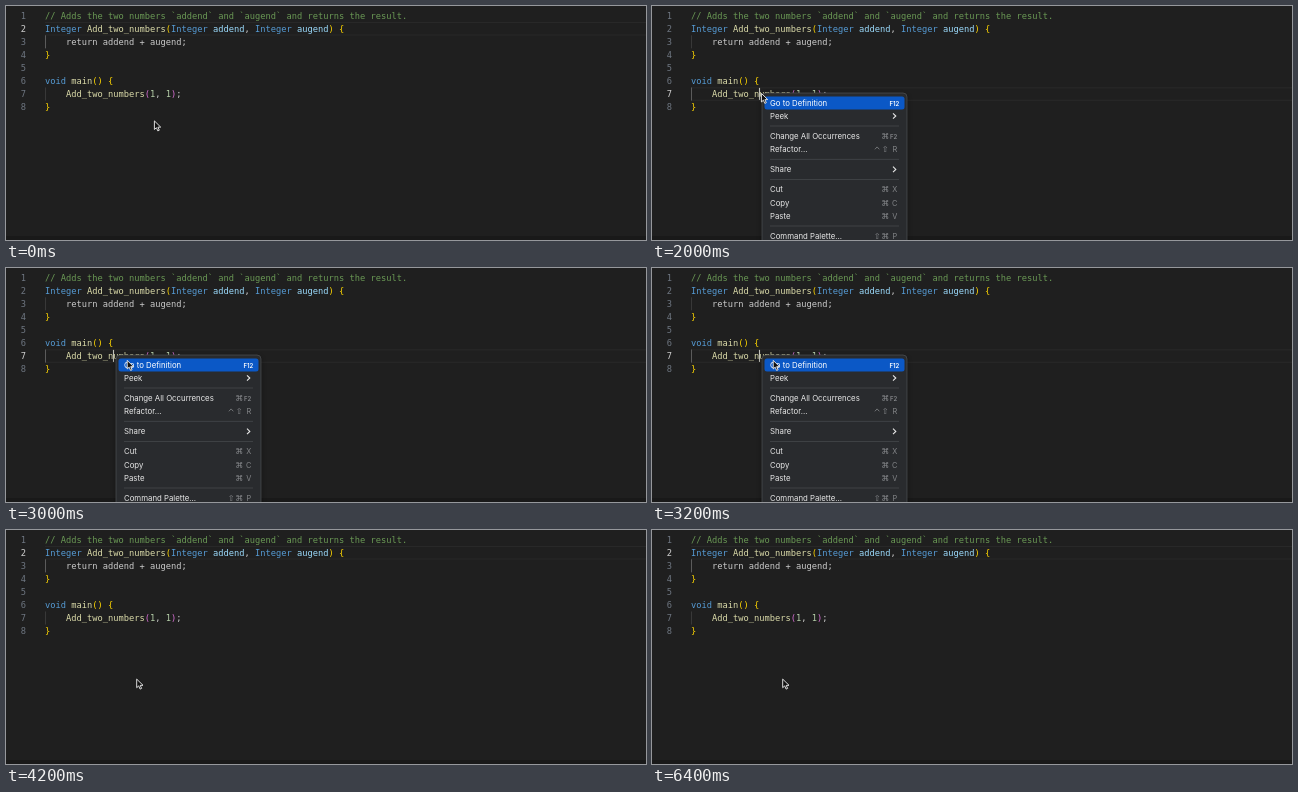
Write an HTML page with a canvas that moves like this. It is 640 px wide and 234 px high and loops after 6500 ms.

```html
<!DOCTYPE html>
<html lang="en">
<head>
<meta charset="utf-8">
<title>Go to Definition</title>
<style>
  html, body { margin: 0; width: 100%; height: 100%; overflow: hidden; background: #1f1f1f; }
  canvas { display: block; width: 640px; height: 234px; }
</style>
</head>
<body>
<canvas id="stage" width="640" height="234"></canvas>
<script>
const ctx = document.getElementById('stage').getContext('2d');
const LOOP = 6500, STEP = 100;
const MENU_OPEN = 2000, MENU_CLOSE = 3500;
const LEFT = 39, CHAR = 5.25, LINE = 13.05;
const CODE_FONT = '8.72px "DejaVu Sans Mono", monospace';
const MENU_FONT = '7.8px Inter, sans-serif';
const KEY_FONT = '7.4px Inter, "DejaVu Sans", sans-serif';

const C = {
  comment: '#6a9955', type: '#569cd6', func: '#dcdcaa', param: '#9cdcfe',
  plain: '#cccccc', gold: '#ffd700', pink: '#da70d6', num: '#b5cea8'
};

// Each line is a list of [text, colour] runs.
const code = [
  [['// Adds the two numbers `addend` and `augend` and returns the result.', C.comment]],
  [['Integer ', C.type], ['Add_two_numbers', C.func], ['(', C.gold], ['Integer ', C.type],
   ['addend', C.param], [', ', C.plain], ['Integer ', C.type], ['augend', C.param], [') {', C.gold]],
  [['    return addend + augend;', C.plain]],
  [['}', C.gold]],
  [],
  [['void ', C.type], ['main', C.func], ['() {', C.gold]],
  [['    ', C.plain], ['Add_two_numbers', C.func], ['(', C.pink], ['1', C.num], [', ', C.plain],
   ['1', C.num], [')', C.pink], [';', C.plain]],
  [['}', C.gold]]
];

const menu = [
  { y: 97, label: 'Go to Definition', key: 'F12' },
  { y: 110, label: 'Peek', sub: true },
  { y: 130, label: 'Change All Occurrences', key: 'F2', mods: '⌘' },
  { y: 143.3, label: 'Refactor…', key: 'R', mods: '^⇧' },
  { y: 163.4, label: 'Share', sub: true },
  { y: 183.5, label: 'Cut', key: 'X', mods: '⌘' },
  { y: 196.8, label: 'Copy', key: 'C', mods: '⌘' },
  { y: 210, label: 'Paste', key: 'V', mods: '⌘' },
  { y: 230.2, label: 'Command Palette…', key: 'P', mods: '⇧⌘' }
];
const rules = [120, 153.3, 173.4, 220];

// Pointer path: time, x, y
const path = [
  [0, 148, 114.5], [600, 148, 114.5], [1100, 110.8, 98], [1200, 109, 92], [1400, 109, 87],
  [2100, 109, 87], [2500, 116.8, 91.5], [2900, 120.8, 92], [3400, 120.8, 92],
  [3700, 130.3, 148.7], [LOOP, 130.3, 148.7]
];

function rect(x, y, w, h, fill) {
  ctx.fillStyle = fill;
  ctx.fillRect(x, y, w, h);
}

function text(str, x, y, fill, align = 'left') {
  ctx.fillStyle = fill;
  ctx.textAlign = align;
  ctx.fillText(str, x, y);
}

function poly(points, stroke, width) {
  ctx.beginPath();
  points.forEach(([x, y]) => ctx.lineTo(x, y));
  ctx.strokeStyle = stroke;
  ctx.lineWidth = width;
  ctx.stroke();
}

function pointerAt(t) {
  const i = path.findIndex(p => p[0] > t);
  const [t0, x0, y0] = path[i - 1], [t1, x1, y1] = path[i];
  const k = (t - t0) / (t1 - t0);
  const e = k * k * (3 - 2 * k);
  return [x0 + (x1 - x0) * e, y0 + (y1 - y0) * e];
}

function drawEditor(active) {
  rect(0, 0, 640, 234, '#1f1f1f');
  rect(0, 230, 640, 4, '#191919');

  const top = 3 + LINE * active;
  rect(LEFT, top, 601, 1, '#292929');
  rect(LEFT, top + LINE - 0.6, 601, 1, '#292929');
  [2, 6].forEach(row => {
    const bright = (row === 2) === (active === 1);
    rect(LEFT, 3.2 + LINE * row, 0.9, LINE, bright ? '#626262' : '#3c3c3c');
  });

  ctx.font = CODE_FONT;
  code.forEach((runs, row) => {
    const y = 12.8 + LINE * row;
    text(row + 1, 20, y, row === active ? '#d0d0d0' : '#6e7681', 'right');
    let col = 0;
    for (const [str, fill] of runs) {
      text(str, LEFT + col * CHAR, y, fill);
      col += str.length;
    }
  });
}

function drawCaret(row, col) {
  rect(LEFT + col * CHAR - 0.3, 3.6 + LINE * row, 1.1, 12, '#c0c0b8');
}

function drawShortcut({ y, key, mods = '' }, selected) {
  const fill = selected ? '#ffffff' : '#85878a';
  ctx.font = key.length > 1 ? '600 6px Inter, sans-serif' : KEY_FONT;
  text(key, selected ? 247.3 : 245.3, y + 2.7, fill, 'right');
  ctx.font = '8.2px "DejaVu Sans", sans-serif';
  [...mods].reverse().forEach((mod, i) => {
    const x = 233.3 - i * 8.2;
    if (mod === '^') poly([[x - 2.2, y], [x, y - 2.4], [x + 2.2, y]], fill, 0.8);
    else text(mod, x, y + 2.8, fill, 'center');
  });
}

function drawMenu() {
  ctx.save();
  ctx.shadowColor = 'rgba(0,0,0,.45)';
  ctx.shadowBlur = 5;
  ctx.shadowOffsetY = 2;
  ctx.beginPath();
  ctx.roundRect(110, 87, 145, 170, 4);
  ctx.fillStyle = '#292b2e';
  ctx.fill();
  ctx.restore();
  ctx.strokeStyle = '#505255';
  ctx.lineWidth = 0.7;
  ctx.stroke();

  ctx.beginPath();
  ctx.roundRect(112.5, 90.5, 140, 13, 2.5);
  ctx.fillStyle = '#0b58c6';
  ctx.fill();
  rules.forEach(y => rect(118, y - 0.4, 129, 0.8, '#44464a'));

  menu.forEach((item, i) => {
    ctx.font = MENU_FONT;
    text(item.label, 118, item.y + 2.7, i ? '#e8e8e8' : '#ffffff');
    if (item.key) drawShortcut(item, i === 0);
    if (item.sub) poly([[241, item.y - 2.7], [243.8, item.y], [241, item.y + 2.7]], '#e8e8e8', 1.1);
  });
}

function drawPointer([x, y]) {
  ctx.save();
  ctx.translate(x, y);
  ctx.beginPath();
  [[0.4, 0.4], [0.4, 9], [2.4, 7.2], [3.8, 10.4], [5.3, 9.7], [3.9, 6.7], [6.7, 6.6]]
    .forEach(([px, py]) => ctx.lineTo(px, py));
  ctx.closePath();
  ctx.fillStyle = '#111111';
  ctx.fill();
  ctx.strokeStyle = '#f2f2f2';
  ctx.lineWidth = 0.9;
  ctx.lineJoin = 'round';
  ctx.stroke();
  ctx.restore();
}

function draw(t) {
  const open = t >= MENU_OPEN && t < MENU_CLOSE;
  const blinkStart = open ? MENU_OPEN : t < MENU_OPEN ? 600 : MENU_CLOSE;
  const caretOn = t >= blinkStart && (t - blinkStart) % 1000 < 500;

  drawEditor(open ? 6 : 1);
  if (caretOn) drawCaret(open ? 6 : 1, open ? 13 : 8);
  if (open) drawMenu();
  drawPointer(pointerAt(t));
}

const start = performance.now();
function tick() {
  const t = (performance.now() - start) % LOOP;
  draw(Math.floor(t / STEP) * STEP);
  requestAnimationFrame(tick);
}
tick();
</script>
</body>
</html>
```
